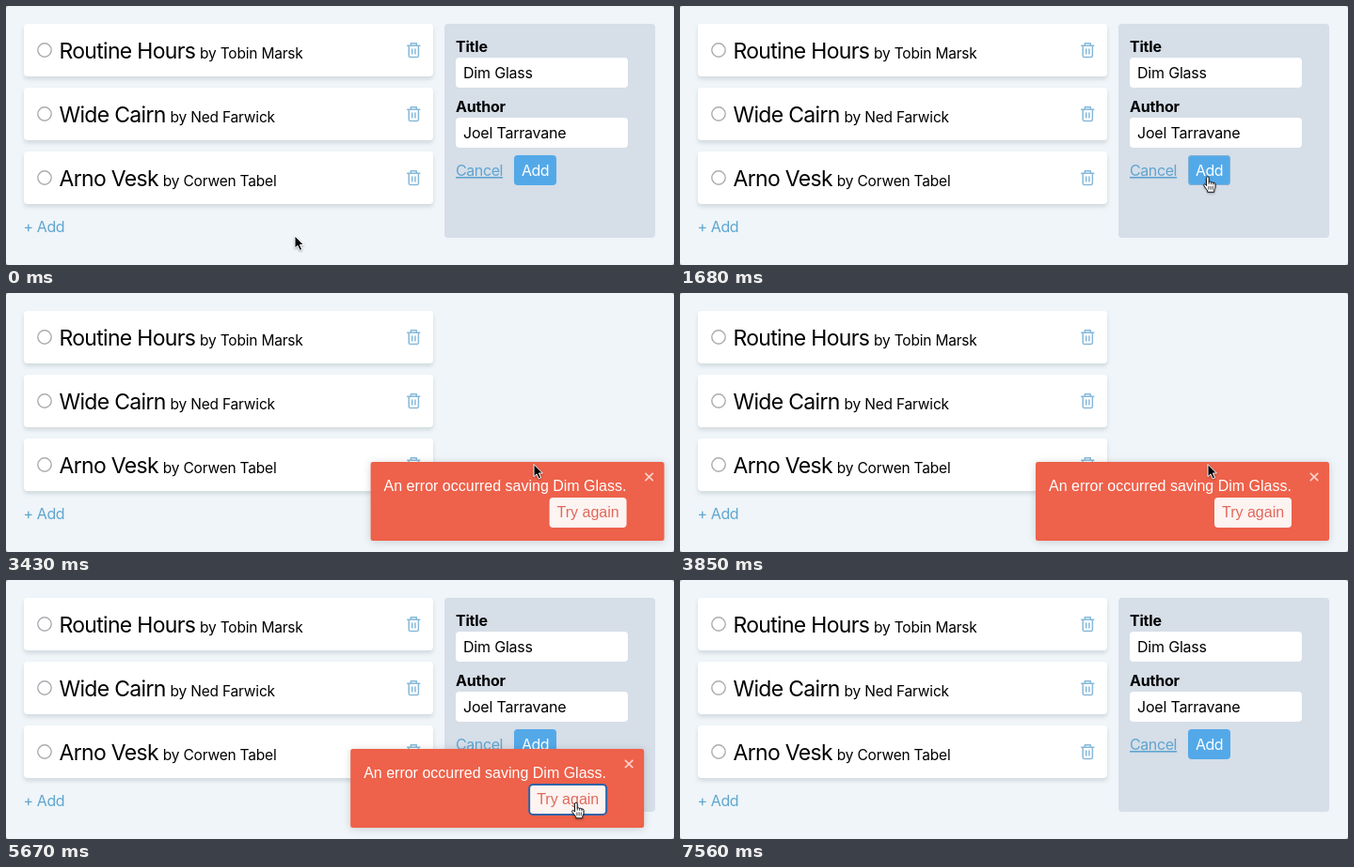
These frames come from a looping animation (710 px wide and 276 px high, 8.05 s). An HTML page:

```html
<!DOCTYPE html>
<html lang="en">
<head>
<meta charset="utf-8">
<title>Reading list</title>
<style>
  html, body { margin: 0; width: 100%; height: 100%; overflow: hidden; background: #a3a8ab; }
  svg { display: block; width: 710px; height: 276px; }
  text { font: 16px Inter, sans-serif; letter-spacing: -.2px; white-space: pre; }
  .book { font-size: 23px; letter-spacing: -.7px; }
  .by { font-size: 15.5px; letter-spacing: -.2px; }
  .label { font-weight: 700; }
  .link { fill: #5fa5d0; letter-spacing: -.4px; }
  .card { fill: #fff; filter: drop-shadow(0 3px 2px rgba(40, 60, 80, .14)); }
  .icon { fill: none; stroke: #86b9da; stroke-width: 1.5; stroke-linejoin: round; stroke-linecap: round; }
  .toast { filter: drop-shadow(0 1px 4px rgba(0, 0, 0, .16)); }
  .toast text { font-family: "Liberation Sans", Arial, sans-serif; letter-spacing: 0; }
  .cursor { filter: drop-shadow(0 1px 1px rgba(0, 0, 0, .3)); }
</style>
</head>
<body>
<svg id="stage" viewBox="0 0 710 276">
  <rect width="710" height="276" rx="3" fill="#eff5f8"/>
  <g id="list"></g>
  <text class="link" x="18.5" y="241">+ Add</text>

  <g id="form">
    <rect x="466" y="19" width="224" height="228" rx="4" fill="#d6dee8"/>
    <text class="label" x="478" y="49">Title</text>
    <rect x="478" y="55" width="183" height="32" rx="4" fill="#fff"/>
    <text x="486" y="77">Dim Glass</text>
    <text class="label" x="478" y="113">Author</text>
    <rect x="478" y="119" width="183" height="32" rx="4" fill="#fff"/>
    <text x="486" y="141">Joel Tarravane</text>
    <text class="link" x="478" y="181" text-decoration="underline">Cancel</text>
    <rect x="540" y="159" width="45" height="32" rx="4" fill="#53a9e8"/>
    <rect id="hover" x="540.5" y="159.5" width="44" height="31" rx="3.5" fill="none" stroke="#7fb0d6"/>
    <text x="548" y="181" fill="#fff" style="letter-spacing: -.5px">Add</text>
  </g>

  <g id="toast" class="toast">
    <rect y="180" width="312" height="84" rx="2.5" fill="#ee614a"/>
    <text x="14" y="211" fill="#fff">An error occurred saving Dim Glass.</text>
    <path d="M291.8 191.8l8.4 8.4m0-8.4l-8.4 8.4" stroke="#f9d0c8" stroke-width="1.7"/>
    <rect x="190" y="218" width="82" height="32" rx="4" fill="#fdf4f2"/>
    <rect id="ring" x="190" y="218" width="82" height="32" rx="4" fill="none" stroke="#2f62a6" stroke-width="2"/>
    <text x="198" y="239" fill="#e0685a">Try again</text>
  </g>

  <g id="cursor" class="cursor">
    <path id="arrow" d="M-1 0V13.2L2 10.4L4.2 15.4L6.6 14.4L4.4 9.5H8.4Z"
          fill="#000" stroke="#fff" stroke-linejoin="round"/>
    <g id="hand" stroke="#111" stroke-linejoin="round" stroke-linecap="round">
      <path d="M-2.6.7a1.4 1.4 0 0 1 2.8 0V5.2q1.3-.9 2.4.3 1.3-.7 2.3.5 1.8-.4 2.1 1.2v3.2q0 1.8-1.2 3V15.8H-1.3V14.3L-5 9.4q-.9-1.8.6-2 .9 0 1.8 1.3z" fill="#fff"/>
      <path d="M-.1 9.8v3M2.1 9.8v3M4.3 9.8v3M.2 5.2v2M2.6 5.6v1.8M4.9 6.2v1.6" fill="none" stroke-width=".8"/>
    </g>
  </g>
</svg>
<script>
const LOOP = 8050;
const $ = id => document.getElementById(id);
const form = $('form'), hover = $('hover'), toast = $('toast'), ring = $('ring');
const cursor = $('cursor'), arrow = $('arrow'), hand = $('hand');

const books = [
  ['Routine Hours', 'Tobin Marsk'],
  ['Wide Cairn', 'Ned Farwick'],
  ['Arno Vesk', 'Corwen Tabel']
];
$('list').innerHTML = books.map(([title, author], i) => `
  <g transform="translate(19 ${19 + 68 * i})">
    <rect class="card" width="435" height="56" rx="4"/>
    <circle cx="22" cy="28" r="7.2" fill="none" stroke="#a9adb1" stroke-width="1.4"/>
    <text class="book" x="37.5" y="37">${title}<tspan class="by" dx="5">by ${author}</tspan></text>
    <path class="icon" d="M407.7 23.3h13.1M411.3 23.3v-2.6h6v2.6M409.2 23.3v10.7q0 1.4 1.4 1.4h7.4q1.4 0 1.4-1.4v-10.7M412.7 27v5M415.9 27v5"/>
  </g>`).join('');

const clamp = v => Math.min(1, Math.max(0, v));
const lerp = (a, b, p) => a + (b - a) * p;
const smooth = p => p * p * (3 - 2 * p);

function bezier(x1, y1, x2, y2) {
  const at = (a, b, s) => 3 * a * s * (1 - s) ** 2 + 3 * b * s * s * (1 - s) + s ** 3;
  return x => {
    let lo = 0, hi = 1;
    for (let i = 0; i < 24; i++) {
      const mid = (lo + hi) / 2;
      if (at(x1, x2, mid) < x) lo = mid; else hi = mid;
    }
    return at(y1, y2, (lo + hi) / 2);
  };
}

// Each key is [position, ...values].
function track(keys, t, ease) {
  if (t <= keys[0][0]) return keys[0].slice(1);
  for (let i = 1; i < keys.length; i++) {
    const a = keys[i - 1], b = keys[i];
    if (t <= b[0]) {
      const p = ease((t - a[0]) / (b[0] - a[0]));
      return a.slice(1).map((v, k) => lerp(v, b[k + 1], p));
    }
  }
  return keys[keys.length - 1].slice(1);
}

// Bounce keys: progress, x offset, opacity
const bounceIn = [[0, 3000, 0], [.6, -25, 1], [.75, 10, 1], [.9, -5, 1], [1, 0, 1]];
const bounceOut = [[0, 0, 1], [.2, -20, 1], [1, 2000, 0]];
const easeIn = bezier(.215, .61, .355, 1);
const easeOut = bezier(.25, .1, .25, 1);

const SUBMIT = 1960, ERROR = 2925, PRESS = 5110, RETRY = 5623, BOUNCE = 700, EXIT = 7120;

const route = [
  [70, 308, 245], [840, 580, 192], [910, 580, 192], [1400, 562, 182.5],
  [4270, 562, 182.5], [4720, 607, 238], [6930, 607, 238], [EXIT, 604, 292]
];
const overAdd = t => t >= 800 && t < SUBMIT;
const overRetry = t => t >= 4340 && t < 5850;

const show = (el, on) => el.setAttribute('visibility', on ? 'inherit' : 'hidden');

function render(t) {
  show(form, t < SUBMIT || t >= RETRY - 20);
  show(hover, overAdd(t));

  const [dx, alpha] = t >= RETRY
    ? track(bounceOut, clamp((t - RETRY) / BOUNCE), easeOut)
    : track(bounceIn, clamp((t - ERROR) / BOUNCE), easeIn);
  const toastOn = t >= ERROR && t < RETRY + BOUNCE;
  toast.setAttribute('transform', `translate(${378 + dx} 0)`);
  toast.setAttribute('opacity', alpha);
  show(toast, toastOn);
  show(ring, toastOn && t >= PRESS);

  const [x, y] = track(route, t, smooth);
  const pointing = overAdd(t) || overRetry(t);
  cursor.setAttribute('transform', `translate(${x} ${y})`);
  show(cursor, t < EXIT);
  show(arrow, !pointing);
  show(hand, pointing);
}

const start = performance.now();
function tick() {
  render((performance.now() - start) % LOOP);
  requestAnimationFrame(tick);
}
tick();
</script>
</body>
</html>
```
